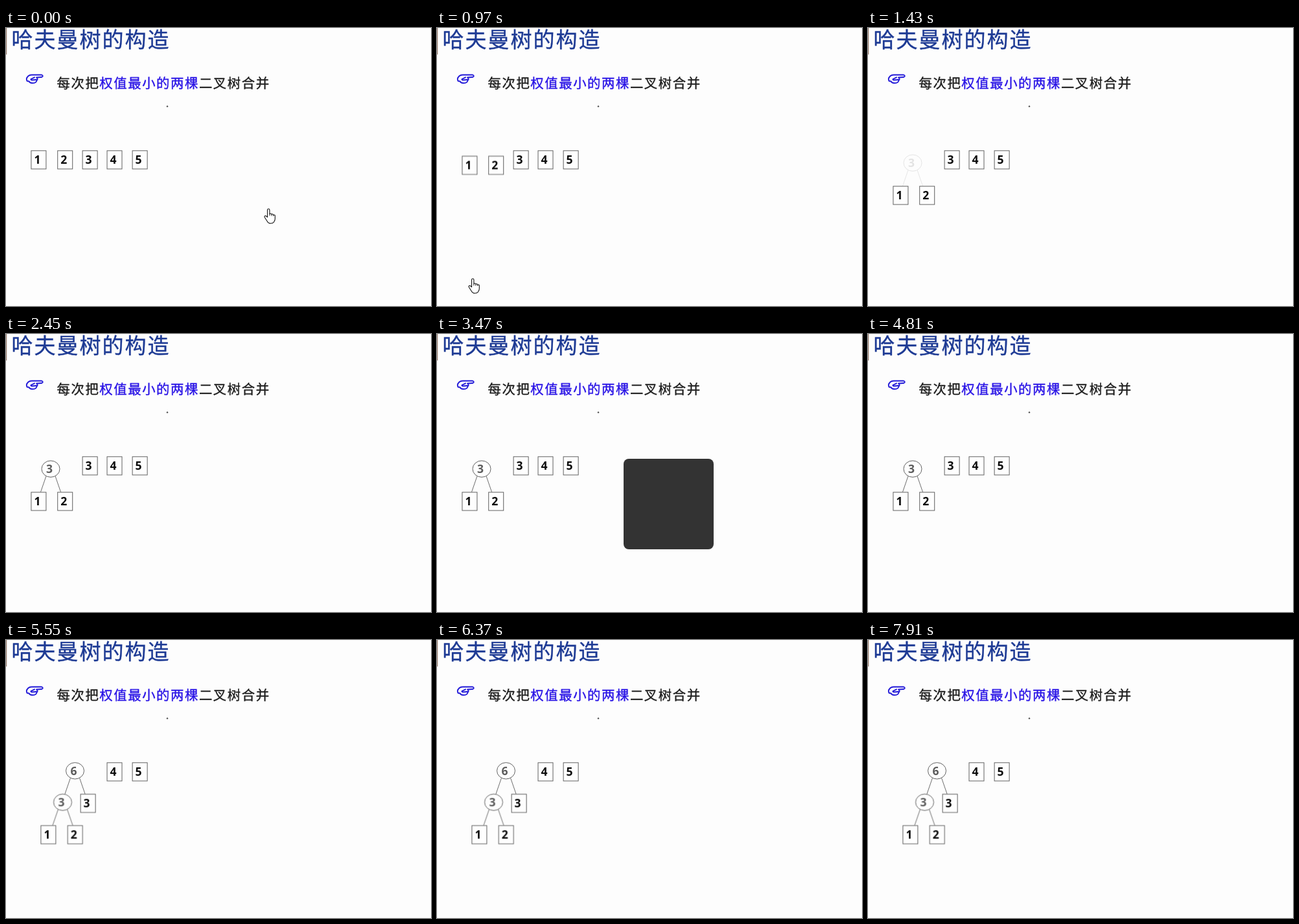
Animation of 656x430 px, one loop 8000 ms. Source, as an HTML page:

```html
<!DOCTYPE html>
<html lang="zh-CN">
<head>
<meta charset="utf-8">
<title>哈夫曼树的构造</title>
<style>
  html, body { margin: 0; width: 100%; height: 100%; overflow: hidden; background: #fdfdfd; }
  svg { display: block; width: 656px; height: 430px; }
  .cjk { font-family: "Noto Sans CJK SC", "Noto Sans CJK", sans-serif; stroke-width: .35; }
  .title { font-size: 33px; letter-spacing: 2px; fill: #1d3a94; stroke: #1d3a94; }
  .rule { font-size: 20.4px; letter-spacing: 1.55px; fill: #1c1c1c; stroke: #1c1c1c; }
  .rule .key { fill: #2a14e6; stroke: #2a14e6; }
  .num { font: 700 17.5px "Open Sans", sans-serif; text-anchor: middle; fill: #0a0a0a; }
  .sum { fill: #5c5c5c; }
  .shape { fill: #fefefe; stroke: #606060; stroke-width: 1; }
  .edge { stroke: #6c6c6c; stroke-width: 1; }
</style>
</head>
<body>
<svg viewBox="0 0 656 430">
  <rect width="656" height="430" fill="#fdfdfd"/>
  <rect width="1.2" height="41" fill="#9c8272"/>
  <text class="cjk title" x="8.5" y="29.5">哈夫曼树的构造</text>
  <g fill="none" stroke="#2118d8" stroke-width="1.9" stroke-linejoin="round" stroke-linecap="round">
    <path d="M33 76 Q35 72.500 40 72.500 L55 72.500 Q58.500 74 55 76 L47 76.500 Q50 79 47.500 81 Q47 85.300 41 85.300 Q37 85.300 35.500 82.500 L32.500 82 Q30.800 78 33 76 Z"/>
    <path d="M44 76.300 L38.500 79 Q38 80.500 40 80.500 L47 80"/>
  </g>
  <text class="cjk rule" x="78.500" y="92.800">每次把<tspan class="key">权值最小的两棵</tspan>二叉树合并</text>
  <circle cx="249" cy="121.300" r="1.200" fill="#555"/>
  <g id="tree"></g>
  <rect id="panel" x="288" y="193" width="139" height="140" rx="8" fill="#333" opacity="0"/>
  <g id="cursor" fill="none" stroke="#111" stroke-linejoin="round">
    <path d="M5.500 13 V2.500 Q5.500 .7 7.200 .7 T8.900 2.500 V8.500 Q10.500 7.400 11.900 9 Q13.600 8.300 14.700 10 Q17.300 9.600 17.300 12 V16 Q17.300 18.500 15.700 20.500 V21 Q14 23.300 10.500 23.300 Q7 23.300 5.500 20.500 L2 15 Q.2 12.600 1.600 11.700 Q2.900 11 4.300 12.500 L5.500 13.700 Z"
      fill="#fff" stroke-width="1.100"/>
    <path d="M8.900 8.500 V11.500 M11.900 9 V11.800 M14.700 10 V12" stroke-width=".9"/>
  </g>
</svg>
<script>
const LOOP = 8000;
const tree = document.getElementById('tree');

function el(tag, attrs, parent = tree, text = '') {
  const node = document.createElementNS('http://www.w3.org/2000/svg', tag);
  for (const k in attrs) node.setAttribute(k, attrs[k]);
  node.textContent = text;
  return parent.appendChild(node);
}

function leaf(n, x) {
  const g = el('g', {});
  el('rect', { class: 'shape', x: x + .5, y: 189.8, width: 23, height: 28.2 }, g);
  el('text', { class: 'num', x: x + 10, y: 210 }, g, n);
  return g;
}

function parentNode(n, x, y, drop) {
  const g = el('g', {});
  for (const side of [-1, 1])
    el('line', { class: 'edge', x1: x + 7 * side, y1: y + 11, x2: x + 15.6 * side, y2: y + drop }, g);
  el('ellipse', { class: 'shape', cx: x, cy: y, rx: 14, ry: 12.7 }, g);
  el('text', { class: 'num sum', x: x - 2, y: y + 6.3 }, g, n);
  return g;
}

// steps: [ms, value, easing to the next step]
function play(node, prop, steps) {
  const last = steps[steps.length - 1];
  const list = [[0, steps[0][1]], ...steps, [LOOP, last[1]]];
  node.animate(list.map(([t, v, easing = 'linear']) => ({ offset: t / LOOP, [prop]: v, easing })),
    { duration: LOOP, iterations: Infinity });
}

const at = (x, y) => `translate(${x}px, ${y}px)`;
const smooth = 'cubic-bezier(.4, 0, .6, 1)';
const merge = [5060, 5420];

function slide(node, from, to) {
  play(node, 'transform', [[merge[0], at(...from), smooth], [merge[1], at(...to)]]);
}

function fade(node, start, end, from, to) {
  play(node, 'opacity', [[start, from], [end, to]]);
}

const three = parentNode(3, 69, 208.7, 36);
const six = parentNode(6, 106.5, 202.3, 36);
const [one, two, box3] = [[1, 38.4], [2, 79.2], [3, 117.6]].map(a => leaf(...a));
leaf(4, 155.5);
leaf(5, 194.6);

[[one, 15], [two, 15.5]].forEach(([node, dx]) => play(node, 'transform', [
  [895, at(0, 0), smooth], [1180, at(0, 55)],
  [merge[0], at(0, 55), smooth], [merge[1], at(dx, 97.3)]
]));
slide(three, [0, 0], [18.5, 42.3]);
slide(box3, [0, 0], [-3, 48.7]);
fade(three, 1420, 1490, 0, 1);
fade(six, 5430, 5530, 0, 1);

play(document.getElementById('panel'), 'opacity',
  [[3470, 0], [3470, 1], [3510, 1], [3840, 0]]);

play(document.getElementById('cursor'), 'transform', [
  [20, at(398, 279), 'ease-out'], [340, at(325, 197)],
  [740, at(325, 197), 'ease-in-out'], [970, at(48, 387)],
  [1000, at(48, 387), 'ease-in'], [1180, at(22, 432)]
]);
</script>
</body>
</html>
```
